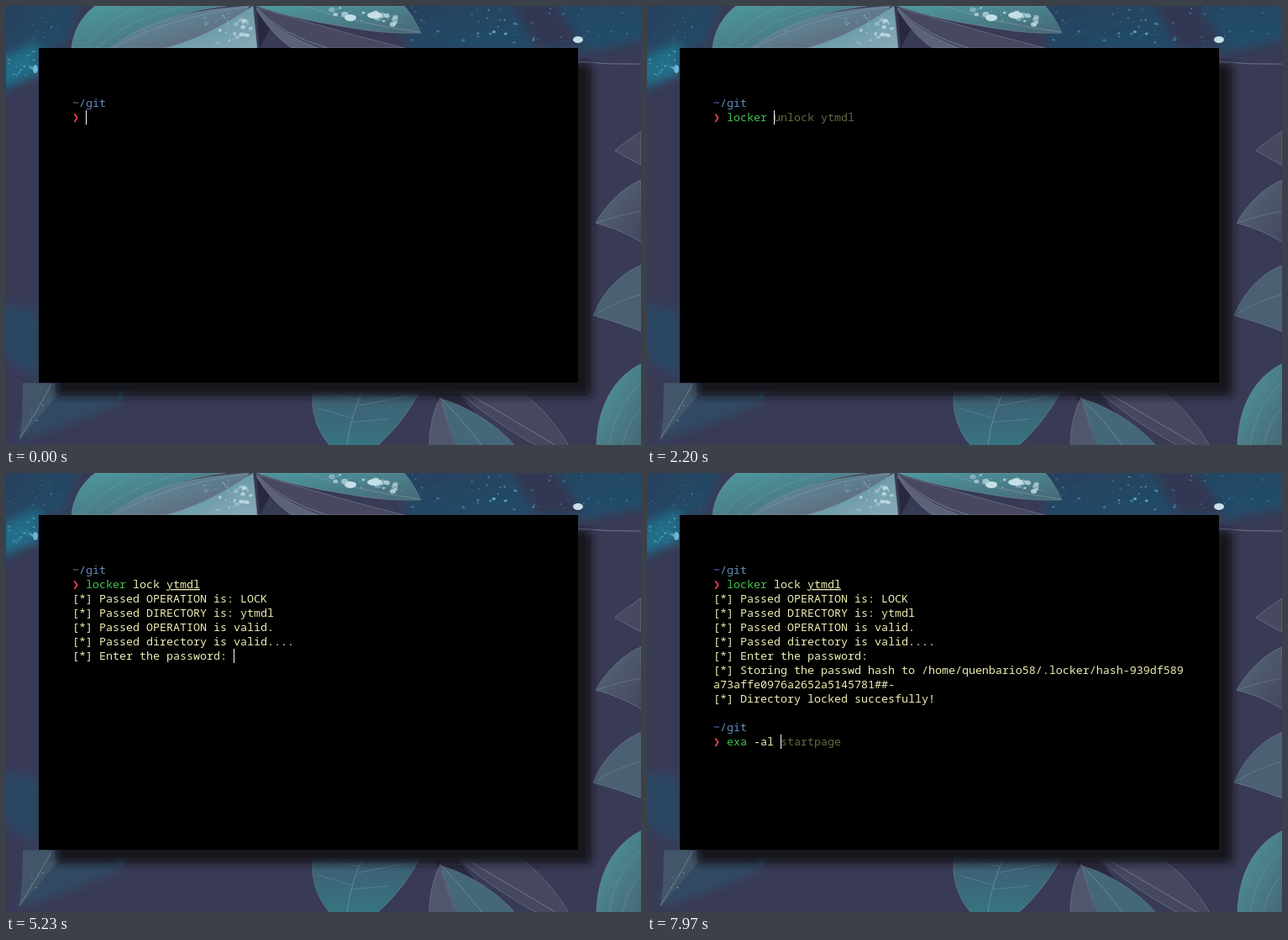
Write an HTML page that moves like this. It is 756 px wide and 522 px high and loops after 8000 ms.

```html
<!DOCTYPE html>
<html lang="en">
<head>
<meta charset="utf-8">
<title>Terminal</title>
<style>
  html, body { margin: 0; width: 100%; height: 100%; overflow: hidden; background: #393a55; }
  svg { display: block; width: 756px; height: 522px; }
  text { font: 13.3333px "Noto Sans Mono", "DejaVu Sans Mono", monospace; white-space: pre; fill: #efedb4; }
  .path { fill: #628bc2; }
  .mark { fill: #ee4352; font-family: "DejaVu Sans Mono", monospace; }
  .bad { fill: #ee4352; }
  .cmd { fill: #43c251; }
  .hint { fill: #676742; }
  .file { text-decoration: underline; }
  .rib { fill: none; stroke: #8795a8; stroke-width: 1; opacity: .65; }
  .vein { fill: none; stroke: #82a9b4; stroke-width: 1; opacity: .35; }
  .edge { stroke: #8199a6; stroke-width: 1; stroke-opacity: .45; }
</style>
</head>
<body>
<svg viewBox="0 0 756 522">
  <defs>
    <linearGradient id="cyan" x2="1" y2="1">
      <stop stop-color="#4d999f"/><stop offset="1" stop-color="#476776"/>
    </linearGradient>
    <linearGradient id="slate" x2="1" y2="1">
      <stop stop-color="#5a98a2"/><stop offset="1" stop-color="#625f76"/>
    </linearGradient>
    <linearGradient id="deep" x2="0" y2="1">
      <stop stop-color="#405a70"/><stop offset="1" stop-color="#367480"/>
    </linearGradient>
    <linearGradient id="pale" x2="1" y2="1">
      <stop stop-color="#4c919c"/><stop offset="1" stop-color="#8ba9b8"/>
    </linearGradient>
    <linearGradient id="plum" x2="1" y2="1">
      <stop stop-color="#566a7a"/><stop offset="1" stop-color="#45455f"/>
    </linearGradient>
    <linearGradient id="blue" x2="1" y2="1">
      <stop stop-color="#283f5d"/><stop offset="1" stop-color="#20506c"/>
    </linearGradient>
    <filter id="soft" x="-20%" y="-20%" width="140%" height="140%"><feGaussianBlur stdDeviation="6"/></filter>
    <filter id="shade" x="-10%" y="-10%" width="120%" height="120%"><feGaussianBlur stdDeviation="5"/></filter>
  </defs>

  <rect width="756" height="522" fill="#393a55"/>

  <g filter="url(#soft)">
    <path d="M-9 -9H88L72 44L36 60L30 84L-9 106Z" fill="url(#blue)"/>
    <path d="M-9 64L40 42V82L-9 98Z" fill="#246d88"/>
    <path d="M455 -9H765V40L690 55H480Z" fill="url(#blue)"/>
    <path d="M600 -9H650L690 50H630Z" fill="#323852"/>
    <path d="M-9 354L39 361V445L-9 412Z" fill="#2c4764"/>
    <path d="M52 444H152L135 472L84 494L14 518L30 470Z" fill="#324863"/>
  </g>
  <path d="M20 448L58 449L62 462L16 516L19 490Z" fill="#425569"/>
  <path class="rib" d="M54 450Q38 480 16 514"/>
  <path d="M124 448H150L136 468Z" fill="#2b6076"/>

  <!-- top leaves -->
  <path class="edge" d="M78 50C80 30 90 12 106 0H262C205 7 164 23 124 50Z" fill="url(#cyan)"/>
  <path class="vein" d="M92 50Q116 18 158 0M108 50Q146 15 210 1"/>
  <path class="edge" d="M124 50C165 19 214 5 290 0C272 25 242 38 192 50Z" fill="url(#slate)"/>
  <path class="rib" d="M128 50Q190 14 288 1"/>
  <path class="edge" d="M190 50C228 40 262 22 294 0L299 50Z" fill="url(#pale)"/>
  <path class="rib" d="M226 50Q264 35 294 2"/>
  <path d="M298 0L317 22L302 50Z" fill="#29293d"/>
  <path class="edge" d="M298 4C328 26 354 40 385 50H340C322 38 308 20 298 4Z" fill="#5c6377"/>
  <path class="edge" d="M298 2C328 10 390 28 420 36C438 41 456 45 474 50H372C338 38 312 20 298 2Z" fill="#484860"/>
  <path class="rib" d="M298 2Q330 35 383 50"/>
  <path class="edge" d="M298 0H474C482 8 488 20 494 32C452 34 417 27 388 22C356 17 322 8 298 0Z" fill="url(#cyan)"/>
  <path class="rib" d="M354 0Q414 20 492 31"/>
  <g id="drops"></g>

  <!-- right leaves -->
  <path class="rib" d="M681 66Q718 70 756 69"/>
  <path class="edge" d="M756 149Q736 162 725 172Q740 181 756 189Z" fill="#474960"/>
  <path class="edge" d="M756 207C736 215 716 234 702 258C724 264 740 271 757 281Z" fill="url(#plum)"/>
  <path class="vein" d="M702 258Q730 248 756 244"/>
  <path class="edge" d="M757 308C730 318 710 342 699 368C718 373 738 380 757 387Z" fill="#4b6073"/>
  <path class="vein" d="M699 368Q728 350 756 343"/>
  <path class="edge" d="M703 523C704 478 722 442 757 425V523Z" fill="url(#cyan)"/>
  <path class="vein" d="M718 522Q726 474 756 448M734 522Q740 494 756 478"/>

  <!-- bottom leaves -->
  <path class="edge" d="M369 447C359 473 369 505 386 523H442C466 502 484 476 499 447Z" fill="url(#deep)"/>
  <path class="rib" d="M430 448Q410 484 406 522"/>
  <path class="vein" d="M420 475L478 464M412 495L455 491M420 468L373 458M412 490L371 478"/>
  <path d="M499 448H528L590 522H540L515 470Z" fill="#2b2b41"/>
  <path class="edge" d="M527 447C560 480 596 503 632 523H670C650 489 625 463 594 447Z" fill="#45485f"/>
  <path class="rib" d="M528 448Q578 477 654 522"/>
  <path class="edge" d="M517 465C508 484 504 502 504 523H534Z" fill="#50566d"/>
  <path class="edge" d="M518 467C548 476 584 497 606 523H536Z" fill="#446779"/>
  <path class="rib" d="M518 467Q540 488 566 522"/>

  <rect x="59" y="69" width="638" height="395" fill="#12121d" filter="url(#shade)"/>
  <rect x="39" y="50" width="642" height="398"/>
  <g id="screen"></g>
  <rect id="cursor" width="1" height="17" fill="#fff"/>
</svg>
<script>
const LOOP = 8000, LEFT = 79, TOP = 107, CELL = 8, ROW = 17;
const screen = document.getElementById('screen');
const cursor = document.getElementById('cursor');

const ENTER = 4500, PASSWORD = 6150, READY = 6400;
const lock = {
  text: 'locker lock ytmdl',
  times: [1250, 1370, 1480, 1600, 1710, 1820, 1970, 2560, 2700, 2830, 2960, 3400, 3600, 3750, 3880, 4000, 4120],
  hint: n => n < 8 ? 'locker unlock ytmdl' : 'locker lock ytmdl'
};
const list = {
  text: 'exa -al ',
  times: [7000, 7120, 7250, 7380, 7520, 7640, 7760, 7870],
  hint: () => 'exa -al startpage'
};
const checks = [
  '[*] Passed OPERATION is: LOCK',
  '[*] Passed DIRECTORY is: ytmdl',
  '[*] Passed OPERATION is valid.',
  '[*] Passed directory is valid....',
  '[*] Enter the password: '
];
const results = [
  '[*] Storing the passwd hash to /home/quenbario58/.locker/hash-939df589',
  'a73affe0976a2652a5145781##-',
  '[*] Directory locked succesfully!'
];

const span = (col, type, text) =>
  `<tspan x="${LEFT + col * CELL}" class="${type}">${text}</tspan>`;
const plain = text => span(0, '', text);

// Syntax colouring: command, then arguments; the word being typed is underlined as a path.
function prompt({ text, times, hint }, t) {
  const count = times.filter(time => t >= time).length;
  const typed = text.slice(0, count);
  const words = typed.split(' ');
  let col = 2, html = span(0, 'mark', '❯');
  words.forEach((word, i) => {
    const known = word === text.split(' ')[0];
    const last = i === words.length - 1;
    const type = i === 0 ? (known ? 'cmd' : 'bad') : last && word[0] !== '-' ? 'file' : '';
    if (word) html += span(col, type, word);
    col += word.length + 1;
  });
  if (count) html += span(2 + count, 'hint', hint(count).slice(count));
  return { html, col: 2 + count };
}

let shown = '';
function draw(now) {
  const t = now % LOOP;
  const first = prompt(lock, t);
  const rows = [span(0, 'path', '~/git'), first.html];
  let col = first.col;
  if (t >= ENTER) {
    rows.push(...checks.map(plain));
    col = checks[4].length;
  }
  if (t >= PASSWORD) {
    rows.push(...results.map(plain), '');
    col = 0;
  }
  if (t >= READY) {
    const next = prompt(list, t);
    rows.push(span(0, 'path', '~/git'), next.html);
    col = next.col;
  }
  const html = rows.map((row, i) => `<text y="${TOP + 13 + i * ROW}">${row}</text>`).join('');
  if (html !== shown) {
    screen.innerHTML = shown = html;
    cursor.setAttribute('x', LEFT + col * CELL);
    cursor.setAttribute('y', TOP + (rows.length - 1) * ROW);
  }
  requestAnimationFrame(() => draw(performance.now()));
}

// Water drops, scattered inside a slanted strip.
let seed = 7;
const random = () => (seed = seed * 16807 % 2147483647) / 2147483647;
const drop = (x, y, rx, ry, color, opacity = 1) =>
  `<ellipse cx="${x.toFixed(1)}" cy="${y.toFixed(1)}" rx="${rx.toFixed(1)}" ry="${ry.toFixed(1)}" fill="${color}" opacity="${opacity.toFixed(2)}"/>`;
function scatter(count, x, y, w, h, slope, size, color) {
  let html = '';
  for (let i = 0; i < count; i++) {
    const dx = random() * w, r = .4 + size * random() ** 2;
    html += drop(x + dx, y + random() * h + slope * dx, r * 1.3, r, color, .35 + random() * .5);
  }
  return html;
}
document.getElementById('drops').innerHTML =
  scatter(35, 388, 1, 82, 12, .14, 3, '#c2dde6') +
  scatter(35, 245, 26, 48, 22, -.3, 2.2, '#c9dce6') +
  scatter(28, 160, 28, 110, 10, -.2, 1, '#8fb3c2') +
  scatter(35, 0, 55, 38, 35, -.25, 1.4, '#52a9c8') +
  scatter(20, 2, 2, 70, 40, 0, .8, '#4585a8') +
  scatter(65, 480, 2, 270, 42, 0, 1.2, '#3f8cab') +
  scatter(18, 560, 2, 50, 35, 0, 1.3, '#6bb6d0') +
  scatter(14, 18, 452, 28, 55, -.5, .9, '#5c9ab2') +
  drop(681, 40, 6, 4, '#c5dfe8') + drop(35, 75, 3, 5, '#6db4d4') +
  drop(439, 11, 9, 4, '#c5dfe8') + drop(410, 14, 7, 4, '#c5dfe8');

draw(performance.now());
</script>
</body>
</html>
```
